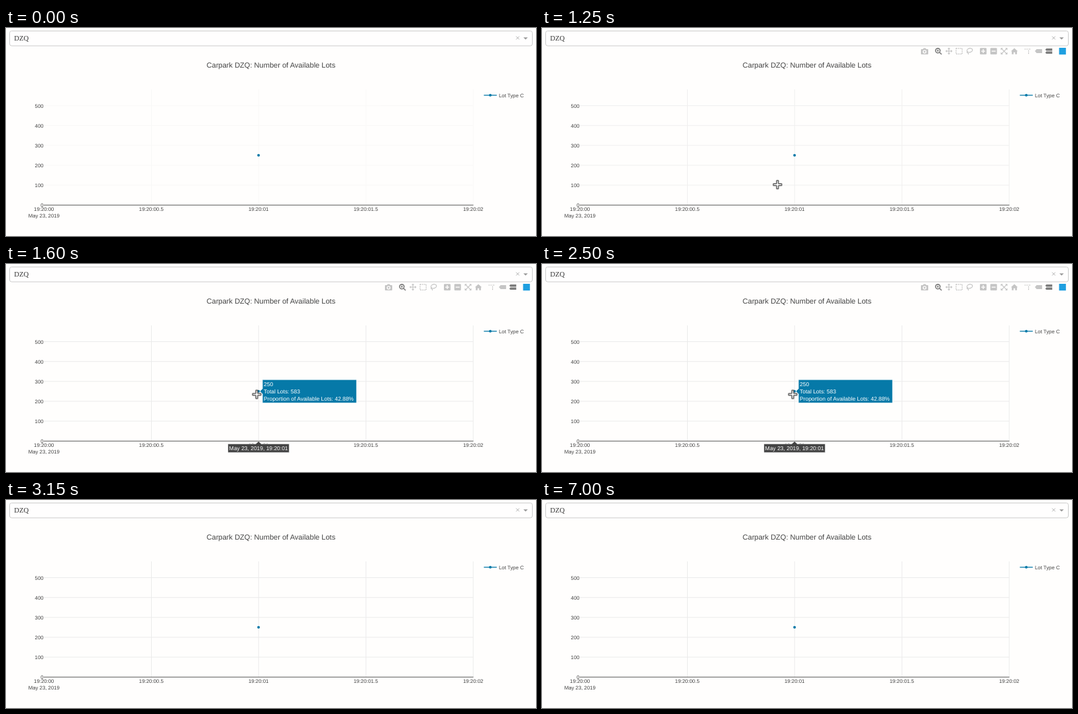
Animation of 800x315 px, one loop 8000 ms. Source, as an HTML page:

```html
<!DOCTYPE html>
<html lang="en">
<head>
<meta charset="utf-8">
<title>Carpark lots</title>
<style>
  html, body { margin: 0; width: 100%; height: 100%; overflow: hidden; background: #fffefd; }
  svg { display: block; width: 100vw; height: 100vh; }
  text { font: 7.8px "Liberation Sans", Arial, sans-serif; fill: #444; text-rendering: geometricPrecision; }
  .mid { text-anchor: middle; }
  .end text { text-anchor: end; }
  .title { font-size: 11.05px; }
  .value { font: 10.7px "Liberation Serif", "Times New Roman", serif; fill: #333; }
  .hover text { font-size: 8.45px; fill: #fff; }
  .grid { stroke: #ebebeb; fill: none; }
  .icons { fill: #c5c5c5; stroke: none; }
  .icons .line { fill: none; stroke: #c5c5c5; stroke-width: 1.2; }
  .icons .on { fill: #7c7c7c; }
  .icons .line.on { fill: none; stroke: #7c7c7c; stroke-width: 1.6; }
  .icons .cut { fill: none; stroke: #fffefd; stroke-width: 1.4; }
  .pointer path { fill: #fff; stroke: #111; stroke-width: 1; }

  .grid, .icons, .hover, .pointer, .arrow, .cross { animation: 8s step-end infinite; }
  .grid { animation-name: settle; }
  .icons { animation-name: bar; }
  .hover { animation-name: hover; }
  .pointer { animation-name: move; }
  .arrow { animation-name: arrow; }
  .cross { animation-name: cross; }

  @keyframes settle {
    0% { opacity: .3; }
    10% { opacity: .75; }
    16.25%, 100% { opacity: 1; }
  }
  @keyframes bar {
    0% { opacity: 0; }
    12.1% { opacity: 0; animation-timing-function: ease; }
    15.85% { opacity: 1; }
    36.875% { opacity: 1; animation-timing-function: ease; }
    39.375%, 100% { opacity: 0; }
  }
  @keyframes hover {
    0% { visibility: hidden; }
    16.25% { visibility: visible; }
    34.375%, 100% { visibility: hidden; }
  }
  /* The pointer advances every 50 ms. */
  @keyframes move {
    0% { transform: translate(311px, 330px); }
    13.125% { transform: translate(320px, 308.5px); animation-timing-function: steps(5); }
    16.25% { transform: translate(364.3px, 219.4px); animation-timing-function: steps(6); }
    20% { transform: translate(378.5px, 197.5px); }
    31.25% { transform: translate(378.5px, 197.5px); animation-timing-function: steps(7); }
    35.625% { transform: translate(359px, 309px); }
    36.875%, 100% { transform: translate(354px, 335px); }
  }
  @keyframes arrow {
    0% { visibility: visible; }
    15% { visibility: hidden; }
    34.375%, 100% { visibility: visible; }
  }
  @keyframes cross {
    0% { visibility: hidden; }
    15% { visibility: visible; }
    34.375%, 100% { visibility: hidden; }
  }
</style>
</head>
<body>
<svg viewBox="0 0 800 315" preserveAspectRatio="none">
  <!-- dropdown -->
  <rect x="5.5" y="4.5" width="789" height="22.5" rx="3" fill="#fffefe" stroke="#ccc"/>
  <text class="value" x="12.3" y="19">DZQ</text>
  <path d="M770 12.6l4.8 4.8m0-4.8l-4.8 4.8" stroke="#aaa" stroke-width=".9"/>
  <path d="M781 14.2h6.6l-3.3 3.4z" fill="#999"/>

  <text class="title mid" x="400" y="60">Carpark DZQ: Number of Available Lots</text>

  <!-- chart -->
  <path class="grid" d="M57 117.6H705M57 147.7H705M57 177.8H705M57 207.9H705M57 238H705M219.5 93V268M381.3 93V268M543.3 93V268M705.2 93V268"/>
  <path d="M57 268.2H705.5" stroke="#444" stroke-width=".9"/>
  <g class="end">
    <text x="56.6" y="120.7">500</text>
    <text x="56.6" y="150.7">400</text>
    <text x="56.6" y="180.7">300</text>
    <text x="56.6" y="210.8">200</text>
    <text x="56.6" y="240.9">100</text>
    <text x="56.6" y="271">0</text>
  </g>
  <g class="mid">
    <text x="57.3" y="276.5">19:20:00</text>
    <text x="57.3" y="287.2">May 23, 2019</text>
    <text x="219.3" y="276.5">19:20:00.5</text>
    <text x="381.2" y="276.5">19:20:01</text>
    <text x="543.2" y="276.5">19:20:01.5</text>
    <text x="705.2" y="276.5">19:20:02</text>
  </g>
  <g fill="#0679a8">
    <circle cx="381.2" cy="192.8" r="2"/>
    <path d="M721.3 101.8h19.5" stroke="#0679a8" stroke-width="1.3"/>
    <circle cx="731" cy="101.8" r="2"/>
  </g>
  <text x="744" y="104.7">Lot Type C</text>

  <!-- toolbar -->
  <g class="icons">
    <path d="M573 32h2l1-1.5h3l1 1.5h2q1 0 1 1v6q0 1-1 1h-9q-1 0-1-1v-6q0-1 1-1z"/>
    <circle class="cut" cx="577.5" cy="36" r="2.1"/>
    <circle class="line on" cx="597.5" cy="34.3" r="3.4"/>
    <path class="line on" d="M600.2 37l3 3"/>
    <path class="line on" d="M595.8 34.3h3.4m-1.7-1.7v3.4" style="stroke-width:1"/>
    <path class="line" d="M610 35h8.4M614.2 31v8"/>
    <path d="M614.2 29.6l2 2.5h-4zM614.2 40.4l2-2.5h-4zM608.8 35l2.5-2v4zM619.6 35l-2.5-2v4z"/>
    <rect class="line" x="625" y="30.8" width="9.2" height="8.6" stroke-dasharray="2 1.1"/>
    <ellipse class="line" cx="645.6" cy="33.8" rx="4.2" ry="3" transform="rotate(-15 645.6 33.8)"/>
    <path class="line" d="M642.3 35.4q-1.6 1.7.3 2.4q1.6.5.8 2.2"/>
    <rect x="661" y="30.2" width="10" height="9.8" rx="1.2"/>
    <path class="cut" d="M663 35.1h6m-3-3v6"/>
    <rect x="676.7" y="30.2" width="10" height="9.8" rx="1.2"/>
    <path class="cut" d="M678.7 35.1h6"/>
    <path class="line" d="M693.8 31.4l7.4 7.4m0-7.4l-7.4 7.4"/>
    <path d="M692.5 30.2h3.4l-3.4 3.4zM702.5 30.2h-3.4l3.4 3.4zM692.5 40h3.4l-3.4-3.4zM702.5 40h-3.4l3.4-3.4z"/>
    <path d="M713 30.4l5.2 4.9h-1.3v4.4h-2.7v-3h-2.4v3h-2.7v-4.4h-1.3z"/>
    <path class="line" d="M728.3 32h2m1 0h2m1.2 0h2.8M734.5 33.8v2m0 1v2.4"/>
    <path d="M744 35l2.6-3h8.2v6h-8.2z"/>
    <path class="on" d="M759.7 32.7l1.6-1.8h8.9v3.5h-8.9zM759.7 37.4l1.6-1.8h8.9v3.5h-8.9z"/>
    <rect x="780.5" y="30" width="10.3" height="10.2" fill="#1f9fe0"/>
  </g>

  <!-- hover labels -->
  <g class="hover">
    <path d="M383.2 192.8l4-3.9V175.3H529v35H387.2V196.7z" fill="#0679a8" stroke="#fff" stroke-width=".5"/>
    <text x="389" y="185.2">250</text>
    <text x="389" y="196.1">Total Lots: 583</text>
    <text x="389" y="207.1">Proportion of Available Lots: 42.88%</text>
    <path d="M381.2 268.4l3.9 4H427.4V285.4H335V272.4H377.3z" fill="#444" stroke="#fff" stroke-width=".5"/>
    <text class="mid" x="381.2" y="281.9">May 23, 2019, 19:20:01</text>
  </g>

  <g class="pointer">
    <path class="arrow" d="M0 0V11L2.6 8.6L4.3 12.4L6 11.6L4.4 8H7.8Z"/>
    <path class="cross" d="M-1.4-6.3h2.8v4.9h4.9v2.8h-4.9v4.9h-2.8v-4.9h-4.9v-2.8h4.9z"/>
  </g>
</svg>
</body>
</html>
```
